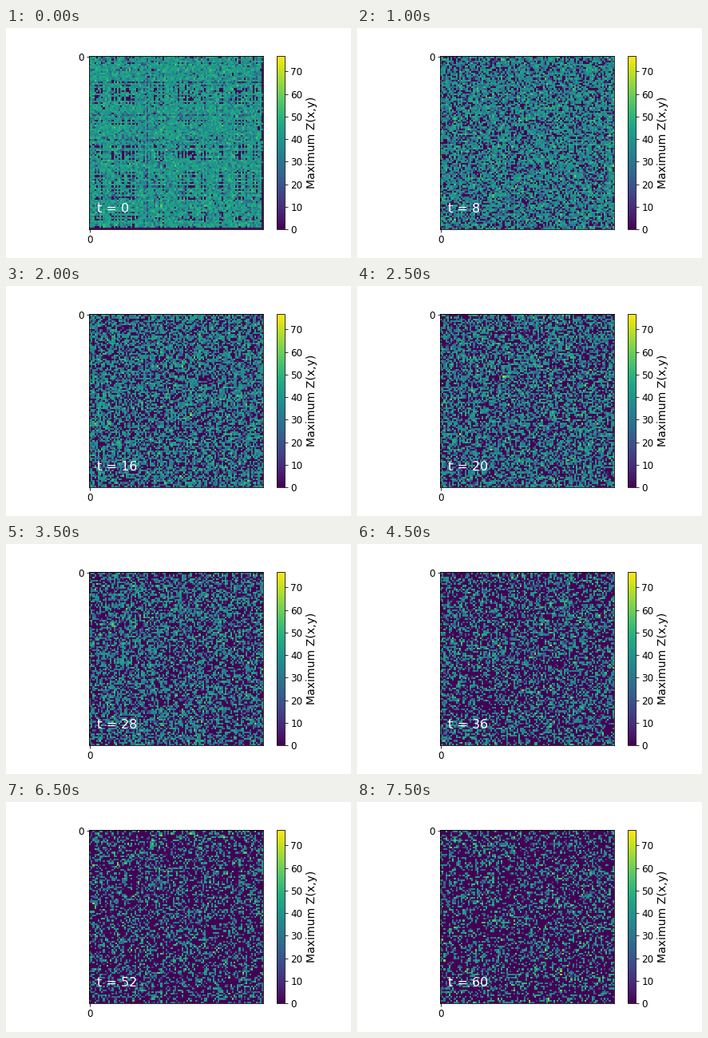
A matplotlib script for the animation above (8000 ms loop, 432 by 288 pixels).

```python
import numpy as np
import matplotlib.pyplot as plt
from matplotlib.animation import FuncAnimation

W, H, DPI = 432, 288, 72
N, FRAMES, STEP = 100, 16, 4
VMAX = 77

plt.rcParams.update({"font.family": "DejaVu Sans", "font.size": 12})


def comb(rng, blocks, extra):
    """Strength of each line: every second one in the blocks, plus strays."""
    on = np.zeros(N, bool)
    for a, b in blocks:
        on[a:b:2] = True
    on[rng.choice(N - 1, extra, replace=False)] = True
    return on * rng.uniform(0.5, 1, N)


def lattice(rng):
    """Nearly even starting surface with empty sites where lines cross."""
    z = rng.normal(42.5, 4.5, (N, N))
    rows = comb(rng, [(2, 6), (17, 28), (37, 41), (55, 60), (67, 80), (90, 95)], 14)
    cols = comb(rng, [(3, 8), (13, 20), (21, 29), (38, 44), (51, 61),
                      (64, 68), (84, 92), (94, 98)], 12)
    p_low = 0.12 + 0.15 * np.maximum(rows[:, None], cols[None, :])
    z = np.where(rng.random((N, N)) < p_low, rng.uniform(16, 37, (N, N)), z)
    for line in (z[15], z[34], z[48], z[:, 31], z[:, 33]):
        dim = rng.random(N) < 0.5
        line[dim] = rng.uniform(8, 32, dim.sum())
    p_empty = np.maximum(rows[:, None] * cols[None, :], 0.015)
    z[rng.random((N, N)) < p_empty] = 0
    z[-1, :] = 0
    z[rng.random(N) < 0.85, -1] = 0
    return z


def surface(t):
    rng = np.random.default_rng(100 + t)
    if t == 0:
        return lattice(rng)
    settle = 1 - np.exp(-t / 8)
    z = rng.normal(42 - 5 * settle, 4.5 + 2.5 * settle + t / 25, (N, N))
    z = np.where(rng.random((N, N)) < 0.18, rng.uniform(8, 32, (N, N)), z)
    filled = 0.92 / (1 + t / 38)
    return np.where(rng.random((N, N)) < filled, np.clip(z, 2, VMAX), 0)


fig, ax = plt.subplots(figsize=(W / DPI, H / DPI), dpi=DPI, facecolor="white")
fig.subplots_adjust(left=0.125, right=0.9, bottom=0.125, top=0.88)

img = ax.imshow(surface(0), cmap="viridis", vmin=0, vmax=VMAX,
                interpolation="nearest")
ax.set_xticks([0])
ax.set_yticks([0])
label = ax.text(4, 90, "t = 0", color="white", fontsize=16)

bar = fig.colorbar(img, ax=ax, ticks=range(0, 80, 10))
bar.set_label("Maximum Z(x,y)", fontsize=14)


def update(i):
    t = i * STEP
    img.set_data(surface(t))
    label.set_text(f"t = {t}")
    return img, label


anim = FuncAnimation(fig, update, frames=FRAMES, interval=500,
                     repeat=True, repeat_delay=0, blit=False)
plt.show()
```
